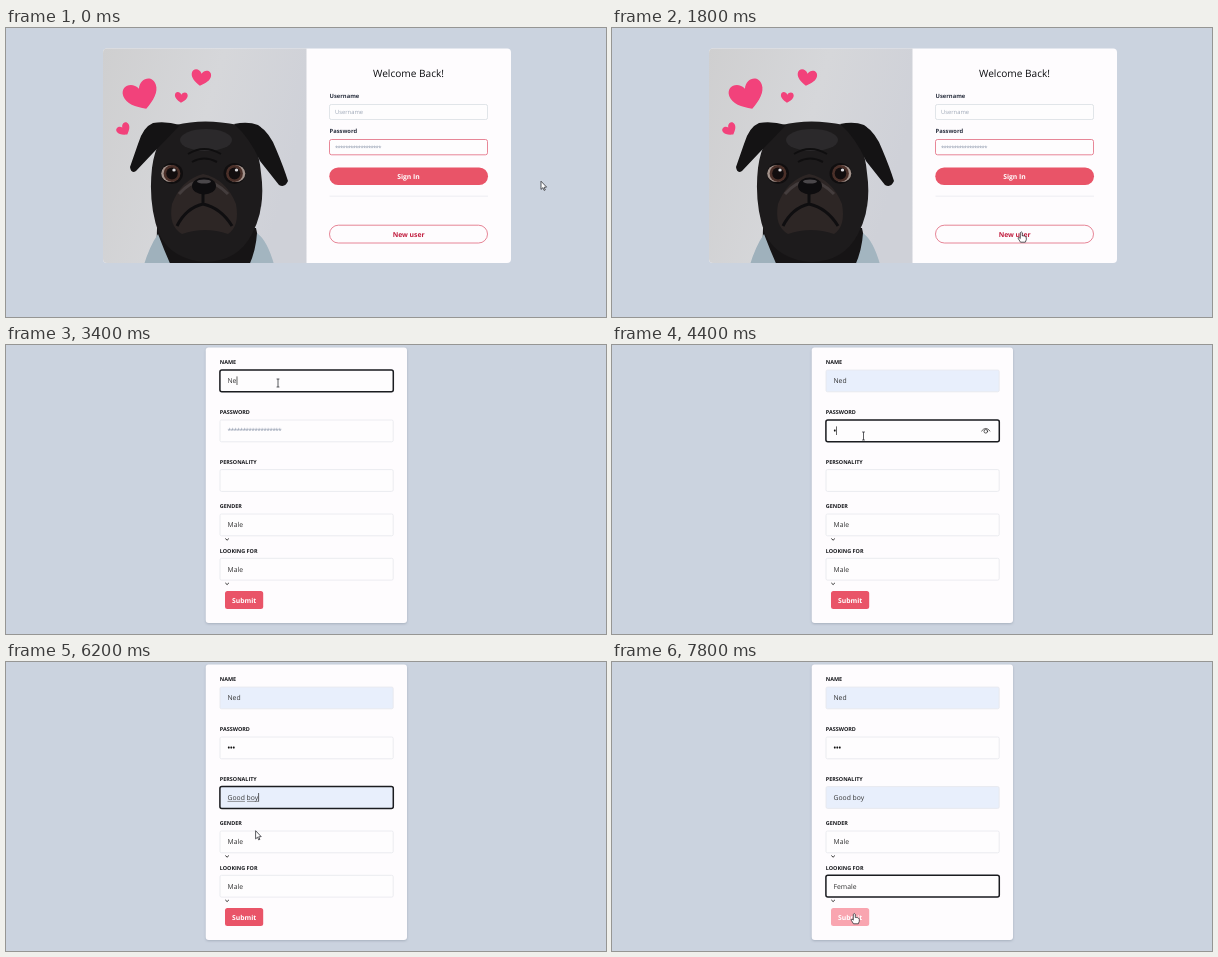
Recreate the animation shown at these times as an HTML page. Size 600 px wide and 289 px high, loop 8 s.

```html
<!DOCTYPE html>
<html lang="en">
<head>
<meta charset="utf-8">
<title>Sign in and sign up</title>
<style>
  html, body { margin: 0; width: 100%; height: 100%; overflow: hidden; background: #cbd3df; }
  svg { display: block; width: 600px; height: 289px; }
  text { font-family: "Open Sans", "Noto Sans", sans-serif; text-rendering: geometricPrecision; white-space: pre; fill: #333; }
  .title { font-size: 10.1px; fill: #0c0d10; }
  .small { font-size: 5.8px; }
  .mid { font-size: 6.8px; }
  .bold { font-weight: 700; fill: #2b3140; }
  .caps { font-size: 5.45px; font-weight: 700; fill: #17181c; }
  .hint { fill: #9fa8b8; }
  .stars { letter-spacing: -.11em; font-weight: 600; }
  .dots { font-weight: 700; fill: #111; }
  .white { fill: #fff; }
  .red { fill: #c21f40; }
  .card { fill: #fefcfe; }
  .raised { filter: drop-shadow(0 1px 1px rgba(60, 70, 90, .25)); }
  .box { fill: #fefdfe; stroke: #e6e7ec; stroke-width: .8; }
  .line { fill: none; stroke: #333; stroke-width: .8; stroke-linecap: round; }
</style>
</head>
<body>
<svg id="stage" viewBox="0 0 600 289"></svg>
<script>
const LOOP = 8000, STEP = 200;
const RED = '#e95468', PALE = '#f9a5b0', BLUE = '#e8effc', PINK = '#f2427b';
const STARS = '*'.repeat(18);

const text = (x, y, cls, str, more = '') => `<text x="${x}" y="${y}" class="${cls}" ${more}>${str}</text>`;
const centred = (x, y, cls, str) => text(x, y, cls, str, 'text-anchor="middle"');
const rect = (x, y, w, h, r, more) => `<rect x="${x}" y="${y}" width="${w}" height="${h}" rx="${r}" ${more}/>`;
const path = (d, fill, more = '') => `<path d="${d}" fill="${fill}" ${more}/>`;
const oval = (x, y, rx, ry, fill) => `<ellipse cx="${x}" cy="${y}" rx="${rx}" ry="${ry}" fill="${fill}"/>`;

const heart = (x, y, size, turn) => path(
  'M0 .42C-.28 .26-.5 .08-.5-.15C-.5-.46-.12-.48 0-.2C.12-.48 .5-.46 .5-.15C.5 .08 .28 .26 0 .42Z',
  PINK, `transform="translate(${x} ${y}) rotate(${turn}) scale(${size})"`);

const eye = (x, y, side) =>
  oval(x, y, 11, 10.5, '#100e0f') + oval(x + side, y, 9.2, 8.6, '#a3938c') +
  oval(x, y, 8.4, 8.4, '#4b3029') + oval(x, y, 5.8, 6, '#120d0e') +
  oval(x + 2, y - 3.4, 1.7, 1.5, '#dcdadd');

const photo = `
  <g clip-path="url(#frame)">
    ${rect(97, 20, 204, 216, 0, 'fill="url(#wall)"')}
    <g filter="url(#soft)">
      ${path('M151 200L150 240H258L250 200Z', '#161415')}
      ${path('M152 206Q143 219 137 240H166Q158 222 152 206Z', '#9fb1bc')}
      ${path('M251 205Q262 213 269 240H242Q250 223 251 205Z', '#a3b5c0')}
      ${path('M170 97Q198 90 232 97Q252 110 255 145Q260 180 246 206Q232 233 200 234Q166 232 153 206Q142 176 146 140Q150 108 170 97Z', '#1d1b1c')}
      ${path('M174 97Q160 93 147 95Q137 99 132 116L124 139Q125 146 130 143L147 125Q160 112 174 97Z', '#141314')}
      ${path('M228 96Q242 93 252 97Q264 105 270 121Q278 140 282 153Q279 160 273 157L254 133Q244 110 228 96Z', '#141314')}
      ${oval(200, 112, 26, 11, '#2b292b')}
      ${path('M182 126Q198 116 215 126M186 134Q198 127 211 134', 'none', 'stroke="#0f0e0f" stroke-width="2"')}
      ${path('M197 146Q175 152 166 176Q162 198 176 206Q199 198 222 206Q234 198 230 176Q220 151 197 146Z', '#2d2625')}
      ${path('M173 166Q196 140 222 166', 'none', 'stroke="#443d3d" stroke-width="3"')}
      ${path('M197 166V176Q180 180 171 198M197 176Q215 180 226 198', 'none', 'stroke="#0f0e10" stroke-width="3"')}
      ${oval(198, 158, 12, 8.5, '#0e0d0f')}
      ${oval(198, 153.5, 7, 2, '#4a474a')}
    </g>
    ${eye(166, 145.5, -1.6)}${eye(228.5, 145.5, 1.6)}
    ${heart(135.3, 67.2, 34.5, -20)}${heart(195, 49.6, 19.5, 8)}
    ${heart(175.2, 69.3, 12.8, 3)}${heart(117.9, 101.7, 14, -35)}
  </g>`;

const login = `
  <g id="login">
    ${rect(97, 20.5, 408, 214.5, 4, 'class="card"')}
    ${photo}
    ${centred(402.5, 48.8, 'title', 'Welcome Back!')}
    ${text(323.5, 70.1, 'small bold', 'Username')}
    ${rect(323.5, 76.5, 158, 15, 2, 'class="box" style="stroke:#dfe2e8;filter:drop-shadow(0 .6px .5px #dcdfe5)"')}
    ${text(329, 86.1, 'small hint', 'Username')}
    ${text(323.5, 105.4, 'small bold', 'Password')}
    ${rect(323.5, 111.5, 158, 15.3, 2, 'class="box" style="stroke:#e2697e"')}
    ${text(329, 121.9, 'small hint stars', STARS)}
    ${rect(323.3, 139.5, 158.7, 17.6, 8.8, `id="signIn" fill="${RED}"`)}
    ${centred(402.5, 150.8, 'mid bold white', 'Sign In')}
    ${rect(323.5, 167.7, 158.5, .8, 0, 'fill="#e9eaef"')}
    ${rect(323.5, 197.2, 158, 17.8, 8.9, 'fill="#fefcfe" stroke="#e0667c" stroke-width=".8"')}
    ${centred(402.6, 208.5, 'mid bold red', 'New user')}
  </g>`;

const field = (id, label, y, value = '', cls = '') => `
  ${text(213.8, y - 5.6, 'caps', label)}
  ${rect(214, y, 173.2, 21.8, 1.5, `id="${id}Box" class="box"`)}
  ${text(221.5, y + 13.4, 'mid ' + cls, value, `id="${id}"`)}`;
const chevron = y => path(`M219.6 ${y}L221.1 ${y + 1.4}L222.6 ${y}`, 'none', 'class="line" style="stroke-width:1"');

const signup = `
  <g id="signup">
    ${rect(199.7, 2.5, 201.3, 275.5, 3, 'class="card raised"')}
    ${field('name', 'NAME', 25)}
    ${field('pass', 'PASSWORD', 75, '', 'dots')}
    ${text(221.5, 88.4, 'mid hint stars', STARS, 'id="passHint"')}
    ${field('mood', 'PERSONALITY', 124.6)}
    ${field('gender', 'GENDER', 169, 'Male')}${chevron(193.8)}
    ${field('want', 'LOOKING FOR', 213.3, 'Male')}${chevron(238.2)}
    ${path('M221.5 139.4H239M241 139.4H252.5', 'none', 'id="underline" stroke="#555" stroke-width=".6"')}
    <g id="reveal">
      ${path('M369.6 86Q373.8 80.6 378 86', 'none', 'class="line"')}
      <circle cx="373.8" cy="86.3" r="1.8" class="line"/>
    </g>
    ${rect(213.9, 0, 173.4, 21.8, 2, 'id="ring" fill="none" stroke="#1b1c20" stroke-width="1.5"')}
    ${rect(0, 0, .7, 8.6, 0, 'id="caret" fill="#222"')}
    ${rect(219, 246, 38.2, 18, 2.5, `id="submit" fill="${RED}"`)}
    ${centred(238.2, 257.5, 'mid bold white', 'Submit')}
  </g>`;

const pointers = `
  <g id="pointer" stroke="#24262b" stroke-width=".75" stroke-linejoin="round">
    ${path('M0 0V8.2L1.9 6.5L3.1 9.2L4.3 8.7L3.1 6.1L5.6 5.9Z', '#fff', 'id="arrow"')}
    ${path('M-1 1Q0-.6 1 1V4.2Q1.8 3.6 2.6 4.4Q3.4 4 4 4.9Q5 4.7 5 6V8L4 10.5H-.8L-3 7Q-3.6 5.6-2.2 5.8L-1 6.8Z', '#fff', 'id="hand"')}
    ${path('M-1.4-4H1.4M0-4V4M-1.4 4H1.4', 'none', 'id="beam"')}
  </g>`;

const stage = document.getElementById('stage');
stage.innerHTML = `
  <defs>
    <linearGradient id="wall" x2="1" y2=".3">
      <stop stop-color="#cfcfd0"/><stop offset=".55" stop-color="#d6d7da"/><stop offset="1" stop-color="#cfd1d8"/>
    </linearGradient>
    <clipPath id="frame"><path d="M300.5 20.5H101Q97 20.5 97 24.5V231Q97 235 101 235H300.5Z"/></clipPath>
    <filter id="soft"><feGaussianBlur stdDeviation=".7"/></filter>
  </defs>${login}${signup}${pointers}`;

const el = {};
stage.querySelectorAll('[id]').forEach(n => el[n.id] = n);

// Each track: [time, value...]
const moves = [
  [0, 535, 153.2], [200, 560, 172], [400, 578, 196], [600, 530, 200], [800, 464, 160],
  [1000, 446, 150.5], [1200, 442, 150.5], [1400, 430, 152], [1800, 409.3, 203.7], [2000, 409.3, 203.7],
  [2200, 400, 182.8], [2600, 272, 38], [3600, 272, 38], [4000, 251.5, 91], [5000, 251.5, 91],
  [5400, 251, 136], [5800, 251, 136], [6000, 250, 159], [6200, 249.6, 168.7], [6600, 253, 223],
  [6800, 253, 223], [7200, 242, 246], [7400, 242.3, 251.3], [8000, 242.3, 251.3]
];
const shapes = [
  [0, 'arrow'], [800, 'hand'], [1600, 'arrow'], [1800, 'hand'], [2200, 'arrow'], [2600, 'beam'],
  [6000, 'arrow'], [7400, 'hand']
];
const focus = [[0, ''], [3000, 'name'], [4000, 'pass'], [5400, 'mood'], [6400, ''], [6600, 'want']];
const values = {
  name: [[0, ''], [3200, 'N'], [3400, 'Ne'], [3600, 'Ned']],
  pass: [[0, ''], [4400, '•'], [4600, '••'], [5000, '•••']],
  mood: [[0, ''], [5600, 'G'], [5800, 'Goo'], [6000, 'Good boy']],
  want: [[0, 'Male'], [7000, 'Female']]
};
const fills = { name: 3600, mood: 6000 };

const at = (track, t) => track.filter(k => k[0] <= t).pop()[1];
const show = (node, on) => node.style.display = on ? '' : 'none';

function place(t) {
  const i = moves.findIndex(m => m[0] > t);
  const [t0, x0, y0] = moves[i - 1], [t1, x1, y1] = moves[i];
  const p = (t - t0) / (t1 - t0);
  return [x0 + (x1 - x0) * p, y0 + (y1 - y0) * p];
}

function draw(t) {
  const first = t < 2200;
  show(el.login, first);
  show(el.signup, !first);
  el.signIn.setAttribute('fill', t >= 800 && t < 1600 ? PALE : RED);
  el.submit.setAttribute('fill', t >= 7400 ? PALE : RED);

  for (const id in values) el[id].textContent = at(values[id], t);
  for (const id in fills) el[id + 'Box'].style.fill = t >= fills[id] ? BLUE : '';

  const active = at(focus, t);
  show(el.passHint, !el.pass.textContent);
  show(el.reveal, active === 'pass' && el.pass.textContent);
  show(el.underline, active === 'mood' && t >= 6000);
  show(el.ring, active);
  show(el.caret, active && active !== 'want');
  if (active) {
    const y = +el[active + 'Box'].getAttribute('y');
    const value = el[active];
    const width = value.textContent ? value.getComputedTextLength() : 0;
    el.ring.setAttribute('y', y);
    el.caret.setAttribute('x', 221.7 + width);
    el.caret.setAttribute('y', y + 6.4);
  }

  const shape = at(shapes, t);
  for (const id of ['arrow', 'hand', 'beam']) show(el[id], id === shape);
  el.pointer.setAttribute('transform', `translate(${place(t)})`);
}

const start = performance.now();
let last = -1;
function tick() {
  const now = Math.max(0, performance.now() - start) % LOOP;
  const t = Math.floor(now / STEP) * STEP;
  if (t !== last) draw(last = t);
  requestAnimationFrame(tick);
}
tick();
</script>
</body>
</html>
```
